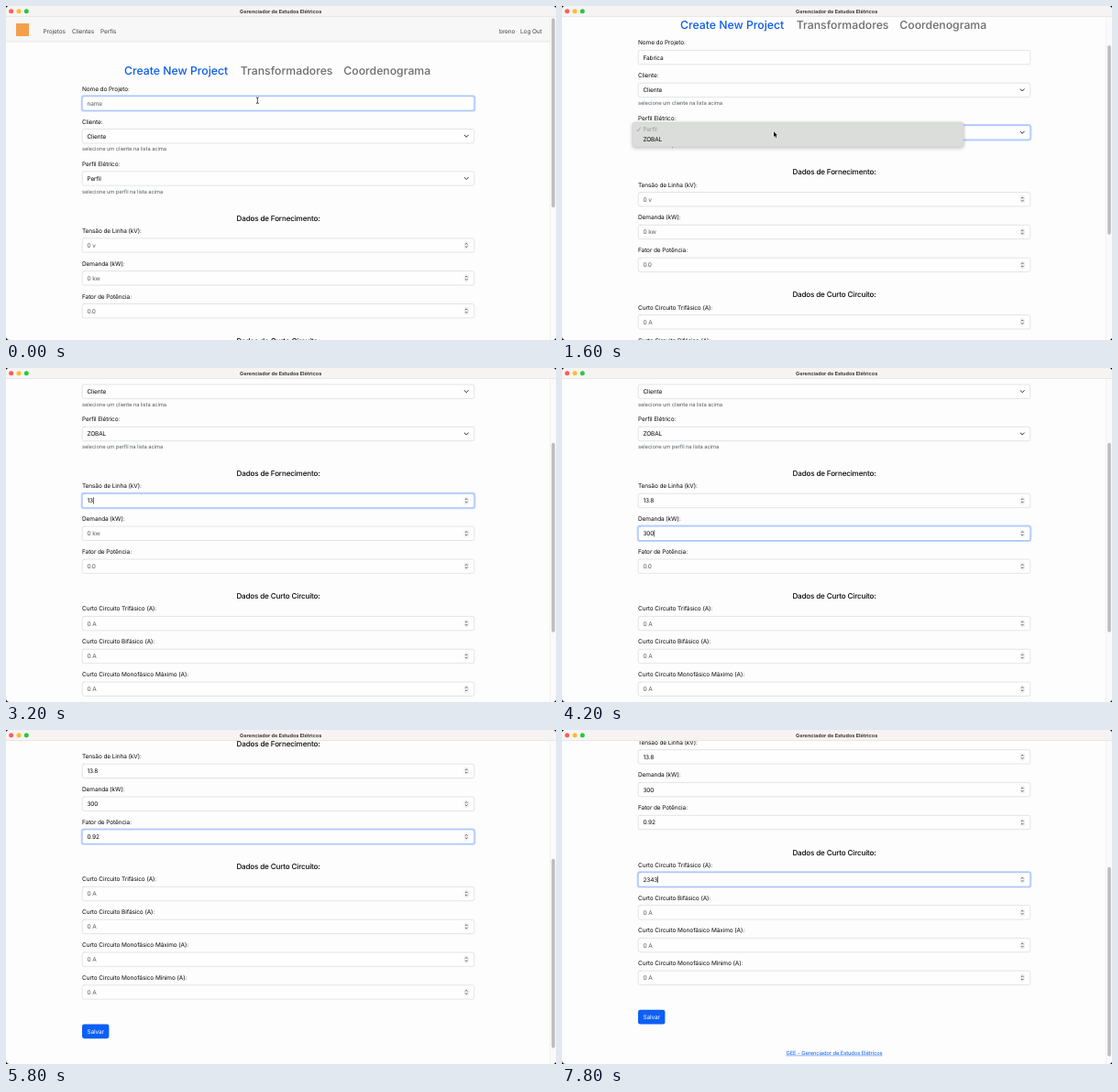
Recreate the animation shown at these times as an HTML page with a canvas. Size 600 px wide and 365 px high, loop 8000 ms.

```html
<!DOCTYPE html>
<html lang="pt">
<head>
<meta charset="utf-8">
<title>Gerenciador de Estudos Elétricos</title>
<style>
html, body { margin: 0; width: 100%; height: 100%; overflow: hidden; background: #000; }
canvas { display: block; width: 600px; height: 365px; }
</style>
</head>
<body>
<canvas id="stage"></canvas>
<script>
const W = 600, H = 365, LOOP = 8000, STEP = 200, BAR = 12;
const LEFT = 83, RIGHT = 511, MID = 297, HALF = 7.9;
const BLUE = '#0d5ff5', INK = '#08090a', MUTED = '#585b5f', PAGE = '#fdfdfd';
const PROFILE = 'ZOBAL', USER = 'breno';

const canvas = document.getElementById('stage');
const ctx = canvas.getContext('2d');
const ratio = window.devicePixelRatio || 1;
canvas.width = W * ratio;
canvas.height = H * ratio;

// Form rows: y is the centre of the box on the unscrolled page.
const fields = [
  { id: 'name', y: 106.4, label: 'Nome do Projeto:', hint: 'name' },
  { id: 'client', y: 142.2, label: 'Cliente:', select: 'Cliente', help: 'selecione um cliente na lista acima' },
  { id: 'profile', y: 188.5, label: 'Perfil Elétrico:', select: 'Perfil', help: 'selecione um perfil na lista acima' },
  { id: 'voltage', y: 261.5, label: 'Tensão de Linha (kV):', hint: '0 v', number: true },
  { id: 'demand', y: 297.3, label: 'Demanda (kW):', hint: '0 kw', number: true },
  { id: 'factor', y: 333.2, label: 'Fator de Potência:', hint: '0.0', number: true },
  { id: 'tri', y: 395.6, label: 'Curto Circuito Trifásico (A):', hint: '0 A', number: true },
  { id: 'bi', y: 431.5, label: 'Curto Circuito Bifásico (A):', hint: '0 A', number: true },
  { id: 'monoMax', y: 467.3, label: 'Curto Circuito Monofásico Máximo (A):', hint: '0 A', number: true },
  { id: 'monoMin', y: 503.1, label: 'Curto Circuito Monofásico Mínimo (A):', hint: '0 A', number: true }
];

const scrollKeys = [[0, 0], [800, 0], [1200, 50.3], [1800, 50.3], [2200, 104], [2400, 104],
  [2800, 116.5], [4400, 116.5], [4800, 201], [5600, 201], [6000, 232.2], [LOOP, 232.2]];

const focusKeys = [[0, 'name'], [1400, 'profile'], [2800, 'voltage'], [3800, 'demand'],
  [5200, 'factor'], [6800, 'tri']];

const typing = {
  name: [[0, ''], [200, 'Fa'], [400, 'Fabr'], [600, 'Fabric'], [800, 'Fabrica']],
  profile: [[0, 'Perfil'], [2000, PROFILE]],
  voltage: [[0, ''], [3000, '1'], [3200, '13'], [3400, '13.'], [3600, '13.8']],
  demand: [[0, ''], [4000, '30'], [4200, '300']],
  factor: [[0, ''], [5400, '0.'], [5600, '0.92']],
  tri: [[0, ''], [7200, '2'], [7400, '23'], [7600, '234'], [7800, '2343']]
};

const caretKeys = [[0, false], [200, true], [1000, false], [3000, true], [5000, false],
  [5200, true], [5800, false], [6800, true]];

const pointerKeys = [
  [0, 'beam', 274.3, 103.2], [200, ''],
  [1000, 'arrow', 268, 108], [1200, 'arrow', 246, 126], [1400, 'arrow', 231, 137.3],
  [1800, 'arrow', 229, 144], [2000, 'arrow', 224, 150], [2200, 'arrow', 210, 190],
  [2400, 'beam', 202.5, 209.5], [2600, 'beam', 196, 180], [2800, 'beam', 190, 146], [3000, ''],
  [4600, 'arrow', 142, 136], [4800, 'arrow', 136, 116], [5000, 'beam', 130, 132], [5400, ''],
  [6000, 'arrow', 106, 128], [6200, 'arrow', 101.8, 138.2], [6600, 'beam', 103, 158],
  [6800, 'beam', 104, 163], [7000, '']
];

function keyAt(keys, t) {
  let found = keys[0];
  for (const key of keys) if (key[0] <= t) found = key;
  return found;
}

function scrollAt(t) {
  const i = scrollKeys.findIndex(key => key[0] > t);
  const [t0, a] = scrollKeys[i - 1], [t1, b] = scrollKeys[i];
  const u = (t - t0) / (t1 - t0);
  return a + (b - a) * u * u * (3 - 2 * u);
}

function text(str, x, y, { size = 6.5, weight = 400, color = INK, align = 'left', track = -0.015 } = {}) {
  ctx.font = `${weight} ${size}px Inter, sans-serif`;
  ctx.letterSpacing = `${size * track}px`;
  ctx.textRendering = 'geometricPrecision';
  ctx.textAlign = align;
  ctx.fillStyle = color;
  ctx.fillText(str, x, y);
  return ctx.measureText(str).width;
}

function rect(x, y, w, h, color) {
  ctx.fillStyle = color;
  ctx.fillRect(x, y, w, h);
}

function round(x, y, w, h, r, fill, stroke, width = 0.5) {
  ctx.beginPath();
  ctx.roundRect(x, y, w, h, r);
  if (fill) { ctx.fillStyle = fill; ctx.fill(); }
  if (stroke) { ctx.strokeStyle = stroke; ctx.lineWidth = width; ctx.stroke(); }
}

function line(points, color, width) {
  ctx.beginPath();
  points.forEach(([x, y]) => ctx.lineTo(x, y));
  ctx.strokeStyle = color;
  ctx.lineWidth = width;
  ctx.lineCap = ctx.lineJoin = 'round';
  ctx.stroke();
}

function chevron(x, y, w, h, color, width) {
  line([[x - w, y - h], [x, y + h], [x + w, y - h]], color, width);
}

function drawField(field, t, focused) {
  const { y } = field;
  const keys = typing[field.id];
  const value = keys ? keyAt(keys, t)[1] : field.select || '';
  text(field.label, LEFT, y - 13.7);
  if (focused) round(LEFT - 1.3, y - HALF - 1.3, RIGHT - LEFT + 2.6, HALF * 2 + 2.6, 3.2, '#c1d6fd');
  round(LEFT + 0.2, y - HALF + 0.2, RIGHT - LEFT - 0.4, HALF * 2 - 0.4, 2, '#fefefe',
    focused ? '#82abfb' : '#c6cbd1', focused ? 0.6 : 0.5);
  const width = text(value || field.hint, LEFT + 5.4, y + 2.4, { color: value ? INK : MUTED });
  if (focused && !field.select && keyAt(caretKeys, t)[1]) {
    rect(LEFT + 5.4 + (value ? width + 0.2 : 0), y - 3.7, 0.6, 7.4, '#111');
  }
  if (field.select) chevron(502.2, y, 2.1, 1.1, '#262b30', 0.95);
  if (field.number) {
    round(499.5, y - 4.4, 5.4, 8.8, 2.2, '#f1f1f1');
    chevron(502.2, y - 1.7, 1.1, -0.55, '#3c3c3c', 0.75);
    chevron(502.2, y + 1.7, 1.1, 0.55, '#3c3c3c', 0.75);
  }
  if (field.help) text(field.help, LEFT, y + 16.2, { size: 5.8, color: MUTED });
}

function drawPage(t) {
  rect(0, BAR, W, 26.8, '#f7f7f8');
  rect(0, 38.7, W, 0.6, '#d6d7d9');
  rect(11, 19, 14, 14, '#f3a04c');
  const grey = { color: '#46484b' };
  text('Projetos', 40.5, 29.5, grey);
  text('Clientes', 72, 29.5, grey);
  text('Perfis', 103, 29.5, grey);
  text(USER, 538, 29.5, grey);
  text('Log Out', 561, 29.5, grey);

  const tab = { size: 12.25, weight: 500, color: '#6c6d6f', track: 0 };
  text('Create New Project', 129, 75.4, { ...tab, color: '#0d5be6' });
  text('Transformadores', 255.8, 75.4, tab);
  text('Coordenograma', 368.3, 75.4, tab);

  const heading = { size: 8.1, weight: 500, align: 'center', track: -0.02 };
  text('Dados de Fornecimento:', MID, 234.7, heading);
  text('Dados de Curto Circuito:', MID, 368.7, heading);

  const focus = keyAt(focusKeys, t)[1];
  for (const field of fields) drawField(field, t, field.id === focus);

  round(LEFT, 538, 29.4, 15.8, 2.4, BLUE);
  text('Salvar', LEFT + 5.4, 548.3, { color: '#fff' });

  const link = text('GEE - Gerenciador de Estudos Elétricos', MID, 587.1,
    { size: 5.8, color: BLUE, align: 'center' });
  rect(MID - link / 2, 587.9, link, 0.45, BLUE);
}

function drawMenu(t) {
  ctx.save();
  ctx.shadowColor = 'rgba(0,0,0,0.28)';
  ctx.shadowBlur = 4 * ratio;
  ctx.shadowOffsetY = ratio;
  round(77, 127.2, 361, 26.8, 2.5, '#dbdddb');
  ctx.restore();
  round(77, 127.2, 361, 26.8, 2.5, null, '#c8cac8', 0.4);
  const hover = t >= 1800;
  if (hover) round(79, 140.6, 357, 10.6, 1.8, '#3d83f5');
  line([[81.8, 135.2], [83, 136.8], [85.4, 132.9]], '#9a9c9a', 0.8);
  text('Perfil', 88.4, 137, { color: '#9a9c9a' });
  text(PROFILE, 88.4, 148.1, { color: hover ? '#fff' : INK });
}

function drawScrollbar(scroll) {
  rect(593.4, BAR, 6.6, H - BAR, '#fafafa');
  rect(593.4, BAR, 0.4, H - BAR, '#e6e6e6');
  round(595.2, 13.3 + scroll * 0.588, 3.6, 207, 1.8, '#bdbdbd');
}

function drawTitleBar() {
  rect(0, 0, W, BAR, '#f6f4f3');
  rect(0, BAR - 0.5, W, 0.5, '#dddada');
  ['#fe5f57', '#febc2e', '#28c840'].forEach((color, i) => {
    ctx.beginPath();
    ctx.arc(5.6 + i * 8.35, 5.7, 2.5, 0, Math.PI * 2);
    ctx.fillStyle = color;
    ctx.fill();
  });
  text('Gerenciador de Estudos Elétricos', 299.7, 7.6,
    { size: 5.5, weight: 700, color: '#3a3939', align: 'center', track: 0 });
}

function drawPointer(kind, x, y) {
  if (!kind) return;
  ctx.save();
  ctx.translate(x, y);
  if (kind === 'beam') {
    const stem = [[0, -2.6], [0, 2.6]];
    const top = [[-1.3, -3.3], [0, -2.6], [1.3, -3.3]];
    const foot = [[-1.3, 3.3], [0, 2.6], [1.3, 3.3]];
    for (const [color, width] of [['#fff', 1.4], ['#111', 0.7]]) {
      [stem, top, foot].forEach(part => line(part, color, width));
    }
  } else {
    ctx.beginPath();
    [[0, 0], [0, 5.6], [1.3, 4.4], [2.3, 6.6], [3.2, 6.2], [2.2, 4.1], [4, 4]]
      .forEach(([px, py]) => ctx.lineTo(px, py));
    ctx.closePath();
    ctx.strokeStyle = '#fff';
    ctx.lineWidth = 1;
    ctx.stroke();
    ctx.fillStyle = '#000';
    ctx.fill();
  }
  ctx.restore();
}

function draw(t) {
  const scroll = scrollAt(t);
  ctx.setTransform(ratio, 0, 0, ratio, 0, 0);
  rect(0, 0, W, H, '#000');
  ctx.save();
  ctx.beginPath();
  ctx.roundRect(0, 0, W, H, 4);
  ctx.clip();
  rect(0, 0, W, H, PAGE);
  ctx.save();
  ctx.translate(0, -scroll);
  drawPage(t);
  ctx.restore();
  drawScrollbar(scroll);
  drawTitleBar();
  if (t >= 1400 && t < 2000) drawMenu(t);
  const [, kind, x, y] = keyAt(pointerKeys, t);
  drawPointer(kind, x, y);
  ctx.restore();
}

// The picture advances five times a second.
function tick() {
  draw(Math.floor((performance.now() % LOOP) / STEP) * STEP);
  requestAnimationFrame(tick);
}
tick();
</script>
</body>
</html>
```
